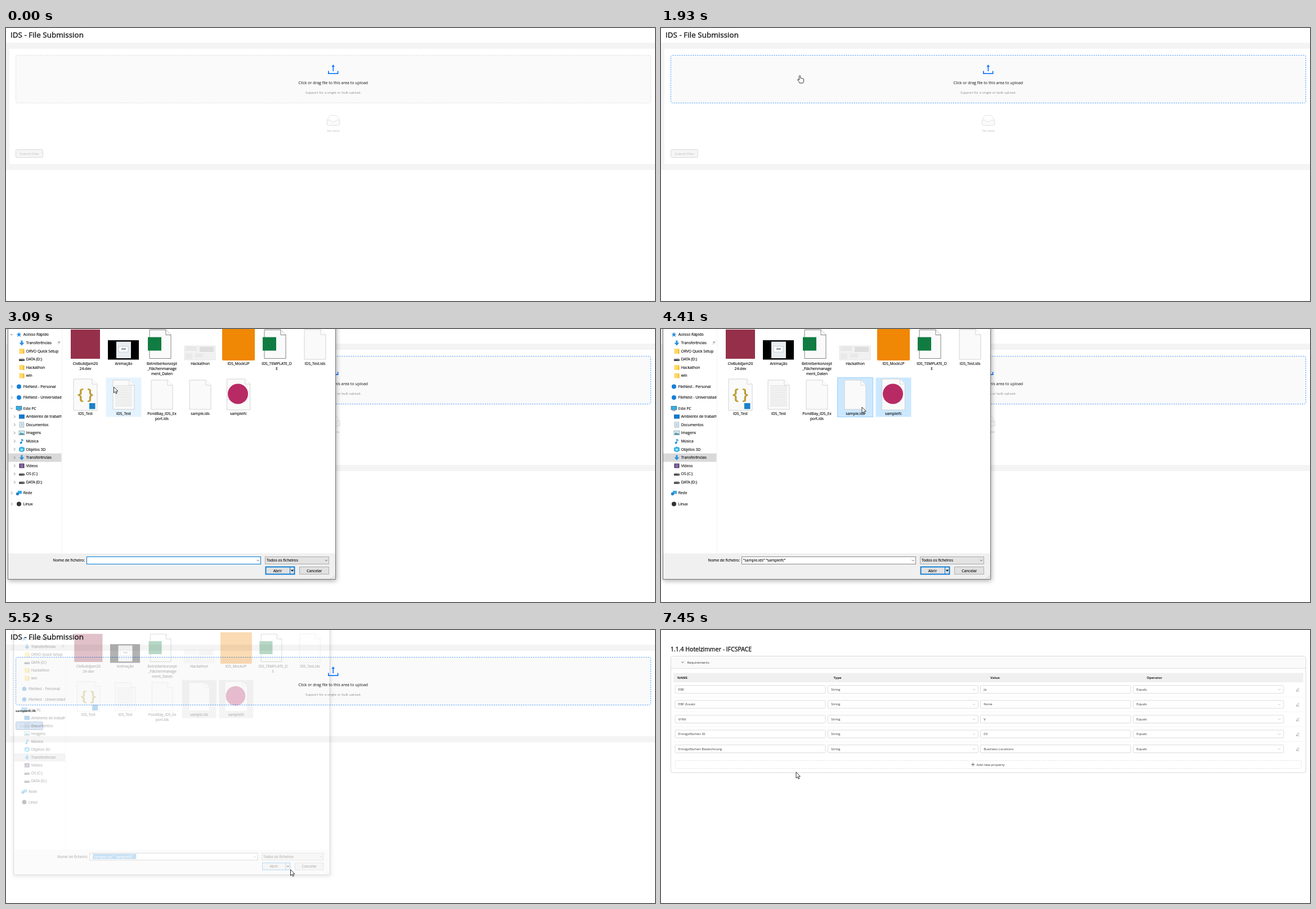
An HTML page that plays this animation: 1153x486 px, repeating every 8000 ms.

```html
<!DOCTYPE html>
<html lang="en">
<head>
<meta charset="utf-8">
<title>File submission</title>
<style>
html, body { margin: 0; width: 100%; height: 100%; overflow: hidden; background: #fff; }
svg { display: block; width: 100vw; height: 100vh; }
text { font-family: "Open Sans", "Noto Sans", sans-serif; white-space: pre; }
#dialog { filter: drop-shadow(1px 2px 4px rgba(0,0,0,.35)); }
#full text { stroke: currentColor; stroke-width: .12; }
.medium { stroke: #111; stroke-width: .3; }
</style>
</head>
<body>
<svg id="stage" viewBox="0 0 1153 486" xmlns="http://www.w3.org/2000/svg"></svg>
<script>
const LOOP = 8000;
const BLUE = [22, 119, 255], HOVER = [64, 150, 255], GREY = [217, 217, 217];

// ---- drawing helpers ----
const rect = (x, y, w, h, fill, more = '') =>
  `<rect x="${x}" y="${y}" width="${w}" height="${h}" fill="${fill}" ${more}/>`;
const path = (d, stroke, width = 1, fill = 'none', more = '') =>
  `<path d="${d}" stroke="${stroke}" stroke-width="${width}" fill="${fill}" ${more}/>`;
const dot = (x, y, r, fill) => `<circle cx="${x}" cy="${y}" r="${r}" fill="${fill}"/>`;
const text = (x, y, size, fill, str, more = '') =>
  `<text x="${x}" y="${y}" font-size="${size}" fill="${fill}" ${more}>${str}</text>`;
const group = (id, body, more = '') => `<g id="${id}" ${more}>${body}</g>`;
const MID = 'text-anchor="middle"';
const chevDown = (x, y, color, s = 2.2) =>
  path(`M${x - s} ${y - s / 2}l${s} ${s}l${s} ${-s}`, color, .8);
const chevRight = (x, y, color) => path(`M${x - 1} ${y - 2.4}l2.4 2.4l-2.4 2.4`, color, .8);

// ---- upload page ----
function uploadPage() {
  const tray = path('M572.9 76.5V81.1H589.6V76.5', '#1677ff', 1.8) +
    path('M581.3 77V68', '#1677ff', 1.7) +
    path('M581.3 65L584.2 69H578.4Z', 'none', 0, '#1677ff');
  const empty = '<ellipse cx="581.5" cy="170" rx="13" ry="4" fill="#f5f5f5"/>' +
    path('M570.5 164L575 156.5Q575.7 155.5 577 155.5H586Q587.3 155.5 588 156.5L592.5 164', '#dcdcdc', .8) +
    path('M570.5 164h6c1.2 0 1 2.3 2.6 2.6h4.8c1.6-.3 1.4-2.6 2.6-2.6h6v7.5q0 1.8-1.8 1.8h-18.4q-1.8 0-1.8-1.8z',
      '#dcdcdc', .8, '#fafafa') +
    text(581.5, 184.5, 6, '#bfbfbf', 'No data', MID);
  return group('backdrop', rect(0, 26, 1153, 227, '#f4f4f4', 'id="grey"') +
      rect(6, 37, 1147, 205, '#fff', 'id="card"') +
      rect(17.5, 48.5, 1128, 85, '#fafafa', 'id="drop" rx="3" stroke-dasharray="2 2"') + tray +
      text(581.3, 100.3, 7, '#111', 'Click or drag file to this area to upload', MID) +
      text(581.5, 116.6, 6, '#888', 'Support for a single or bulk upload.', MID) +
      group('empty', empty) +
      text(17, 146, 6, '#111', 'sampleifc.ifc', 'id="listed" font-weight="600"') +
      group('submit', rect(17.5, 216.5, 48, 14, '#f5f5f5', 'id="btn" rx="2"') +
        text(41.5, 226, 6, '#bfbfbf', 'Submit Files', MID + ' id="btnText"'))) +
    text(8, 17, 13.5, '#111', 'IDS - File Submission', 'id="title" class="medium"');
}

// ---- requirements page ----
const COLS = [25, 296.5, 567.5, 839];
const ROWS = [['EBF', 'Ja'], ['EBF Zusatz', 'None'], ['V/NV', 'V'],
  ['Ertragsflächen ID', '03'], ['Ertragsflächen Bezeichnung', 'Business Locations']];
const rowY = i => 105.8 + i * 26.45;

function resultPage() {
  let s = text(17, 38, 10.5, '#111', '1.1.4 Hotelzimmer - IFCSPACE', 'class="medium"') +
    rect(17.5, 46.5, 1128, 207.5, '#fff', 'rx="3" stroke="#d9d9d9"') +
    path('M18 68.5V49.5q0-2.5 2.5-2.5h1122q2.5 0 2.5 2.5V68.5z', 'none', 0, '#fafafa') +
    path('M18 68.3H1145', '#d9d9d9', .8) + chevDown(38.5, 57.5, '#333') +
    text(46.5, 59.6, 6, '#333', 'Requirements') + rect(22, 76.5, 1119, 16.5, '#f0f0f0');
  ['NAME', 'Type', 'Value', 'Operator'].forEach((label, i) => {
    s += text([29, 306.5, 585, 863][i], 86.7, 6, '#222', label, 'font-weight="700"');
  });
  ROWS.forEach(([name, value], r) => {
    const y = rowY(r);
    [name, 'String', value, 'Equals'].forEach((label, c) => {
      s += rect(COLS[c], y - 7, 267, 14, '#fff', `id="cell${r}_${c}" rx="1.5" stroke="#d9d9d9" stroke-width=".9"`) +
        text(COLS[c] + 5.8, y + 2.1, 6, '#333', label);
      if (c % 2) s += chevDown(COLS[c] + 259.5, y + .2, '#bbb');
    });
    s += path(`M1129 ${y + 1.5}l3.2-3.6l1.3 1.2l-3.2 3.5l-1.6.3zM1128.5 ${y + 3.2}h5.5`, '#999', .7);
    if (r < 4) s += path(`M22 ${y + 13.5}H1141`, '#f3f3f3', .8);
  });
  return s + rect(25.5, 232.5, 1112, 14, '#fff', 'rx="2" stroke="#d9d9d9" stroke-width=".9" stroke-dasharray="2 2"') +
    path('M551 239.5h6.4M554.2 236.3v6.4', '#444', .8) + text(560.5, 241.6, 6, '#333', 'Add new property');
}

// ---- file dialog ----
const ICONS = {
  star: (x, y) => path(`M${x} ${y - 4.5}l1.3 3h3.2l-2.5 2.1l1 3.3l-3-1.9l-3 1.9l1-3.3l-2.5-2.1h3.2z`, 'none', 0, '#2b8fe0'),
  down: (x, y) => path(`M${x - 1.5} ${y - 4.5}h3v4h3l-4.5 5l-4.5-5h3z`, 'none', 0, '#2b8fdf'),
  folder: (x, y) => rect(x - 4.5, y - 4.5, 9, 9, '#ffd968', 'rx=".6"') + rect(x + 2, y - 3, 2.5, 7.5, '#f2bf3f'),
  drive: (x, y) => rect(x - 5, y - .5, 10, 3.5, '#444', 'rx=".8"') + rect(x - 4, y - 1.8, 8, 1.4, '#bbb') +
    rect(x + 2, y + 1, 1.6, 1, '#6cf'),
  cloud: (x, y) => dot(x, y, 4, '#1580d8'),
  pc: (x, y) => rect(x - 5, y - 4, 10, 6.5, '#35aee9', 'stroke="#356" stroke-width=".6"') + rect(x - 3, y + 3.4, 6, 1.2, '#789'),
  desk: (x, y) => rect(x - 5, y - 3.8, 10, 7.5, '#1678c8'),
  doc: (x, y) => rect(x - 3.5, y - 4.5, 7, 9, '#fff', 'stroke="#79a" stroke-width=".8"') +
    path(`M${x - 2} ${y - 2}h4m-4 2h4m-4 2h4`, '#4a8fc0', .7),
  image: (x, y) => rect(x - 5, y - 3.8, 10, 7.6, '#cfeaf8', 'stroke="#899" stroke-width=".7"') +
    path(`M${x - 4.5} ${y + 3}l3-4l2.5 2.5l1.5-1.5l2 3z`, 'none', 0, '#3f8f9f'),
  music: (x, y) => path(`M${x} ${y + 3}v-7q.5 2 3 3`, '#1488d8', 1.3) + dot(x - 1.5, y + 3, 1.8, '#1488d8'),
  cube: (x, y) => path(`M${x} ${y - 4.5}l4.5 1.8v5.4l-4.5 1.8l-4.5-1.8v-5.4z`, '#1686b5', .6, '#38bde8') +
    rect(x - 1.5, y - 1, 3, 3, '#d8f5ff'),
  film: (x, y) => rect(x - 4.5, y - 4, 9, 8, '#443c50') + rect(x - 2.7, y - 3, 5.4, 6, '#8c64b4'),
  net: (x, y) => rect(x - 2, y - 4, 7, 5.5, '#35aee9') + dot(x - 2.5, y + 1.5, 2.7, '#2c80c8'),
  disc: (x, y) => dot(x, y, 4, '#333')
};
// [label, centre y, icon, depth, chevron]
const NAV = [
  ['Acesso Rápido', 10, 'star', 0, 'd'], ['Transferências', 25, 'down', 1], ['ORVO Quick Setup', 39.5, 'folder', 1],
  ['DATA (D:)', 54, 'drive', 1], ['Hackathon', 68.5, 'folder', 1], ['win', 83, 'folder', 1],
  ['FileNest - Personal', 102.5, 'cloud', 0, 'r'], ['FileNest - Universidade', 122, 'cloud', 0, 'r'],
  ['Este PC', 141.3, 'pc', 0, 'd'], ['Ambiente de trabalho', 156, 'desk', 1, 'r'], ['Documentos', 170.5, 'doc', 1, 'r'],
  ['Imagens', 185, 'image', 1, 'r'], ['Música', 199.7, 'music', 1, 'r'], ['Objetos 3D', 214.3, 'cube', 1, 'r'],
  ['Transferências', 229, 'down', 1, 'r'], ['Vídeos', 243.5, 'film', 1, 'r'], ['OS (C:)', 258, 'drive', 1, 'r'],
  ['DATA (D:)', 272.7, 'drive', 1, 'r'], ['Rede', 292, 'net', 0, 'r'], ['Linux', 311.5, 'disc', 0, 'r']
];

const sheet = (x, y, w = 38, h = 53, edge = '#c9c9c9') =>
  path(`M${x - w / 2} ${y}h${w - 9}l9 9v${h - 9}h${-w}z`, edge, .8, '#fafafa') +
  path(`M${x + w / 2 - 9} ${y}v9h9`, edge, .8, '#fff');
const table = x => sheet(x - 3, 1.5, 38, 51, '#666') + rect(x - 25, 14.5, 24, 24, '#107c41');
const lines = (x, y, w, n, gap, color) =>
  Array.from({ length: n }, (_, i) => path(`M${x} ${y + i * gap}h${w}`, color, .6)).join('');

const FILES = [
  [['CivBuildJam20', '24-dev'], x => rect(x - 26, 1, 52, 52, '#96304a')],
  [['Animação'], x => rect(x - 28, 20, 55, 34.5, '#000') + rect(x - 13, 22.5, 26, 29.5, '#e9edf0') +
    rect(x - 9, 31, 17, 10, '#fff', 'stroke="#b5bcc4" stroke-width=".7"') + rect(x - 4, 34, 8, 3, '#9aa5b0')],
  [['Betreiberkonzept', '_Flächenmanage', 'ment_Daten'], table],
  [['Hackathon'], x => rect(x - 28, 30, 55, 25, '#f1f1f1', 'stroke="#ddd" stroke-width=".6"') +
    lines(x - 26, 32.5, 20, 3, 2.5, '#ccc') + lines(x - 1, 33, 25, 4, 2.2, '#aaa') +
    lines(x - 26, 45, 12, 4, 2.4, '#d2d2d2') + lines(x - 9, 45, 14, 3, 2.4, '#d2d2d2')],
  [['IDS_MockUP'], x => rect(x - 29, -2, 58, 58, '#f08705', 'rx="2"')],
  [['IDS_TEMPLATE_D', 'E'], table],
  [['IDS_Test.ids'], x => sheet(x, 1)],
  [['IDS_Test'], x => sheet(x, 89, 42, 56) + text(x, 125, 27, '#c4a32a', '{ }', MID + ' font-weight="600"') +
    rect(x + 7, 132, 10.5, 10.5, '#1b80c9')],
  [['IDS_Test'], x => sheet(x, 91, 38, 52) + lines(x - 15, 101, 30, 13, 3, '#c2c2c2')],
  [['PondBay_IDS_Ex', 'port.ids'], x => sheet(x, 91, 38, 52)],
  [['sample.ids'], x => sheet(x, 91, 38, 52)],
  [['sampleifc'], x => sheet(x, 89, 41, 55) + dot(x - 1, 115.5, 18, '#b82a64')]
];
const fileX = i => 141 + 68 * (i % 7);

function dialogBox() {
  const size = 6.7, ink = '#000';
  let nav = '', chevs = '', files = '';
  NAV.forEach(([label, y, icon, depth, chev]) => {
    const x = 23 + depth * 5;
    nav += ICONS[icon](x, y) + text(x + 7.7, y + 2.4, size, ink, label);
    if (chev) chevs += (chev === 'd' ? chevDown : chevRight)(10 + depth * 5, y, '#666');
  });
  FILES.forEach(([label, icon], i) => {
    const x = fileX(i), low = i > 6;
    files += rect(x - 31.5, low ? 86.5 : -30, 63, low ? 70 : 116, 'none', `id="file${i}"`) + icon(x) +
      label.map((s, k) => text(x, (low ? 153 : 63.6) + 9 * k, size, ink, s, MID)).join('');
  });
  const full = rect(4, 221.5, 94.5, 15, '#d9d9d9') + group('nav', nav, 'clip-path="url(#navClip)"') +
    group('chevs', chevs) + path('M93 22.5l2.5 2.5m-1.2-3.4l2 2l-1.7.5l-1 1.3l-1.2-1.3zM92 27.5l2-2', '#888', .7) +
    path('M99.5 0V399', '#f2f2f2') + files +
    text(140, 414.2, 6.8, ink, 'Nome de ficheiro:', 'text-anchor="end"') +
    rect(143.5, 405.5, 309, 13, '#fff', 'id="field"') +
    rect(149, 407, 80, 9.5, '#3a8fd9', 'id="mark"') + text(146, 414.2, size, ink, '', 'id="fieldText"') +
    chevDown(447.7, 412, '#555') + rect(460.5, 405.5, 113, 13, '#e3e3e3', 'stroke="#adadad"') +
    text(463, 414.2, size, ink, 'Todos os ficheiros') + chevDown(569, 412, '#555') +
    rect(461.5, 423.5, 51, 13, '#e1e1e1', 'id="open" stroke="#0078d7"') +
    path('M504.5 423V437', '#0078d7') + text(482.5, 432.5, size, ink, 'Abrir', MID) +
    path('M505.8 428.8h5.4l-2.7 3z', 'none', 0, '#000') +
    rect(521.5, 423.5, 52, 13, '#e1e1e1', 'stroke="#adadad"') + text(547.8, 432.5, size, ink, 'Cancelar', MID) +
    path('M583 439v5M580.5 441.5v2.5M578 443v1', '#aaa', 1, 'none', 'stroke-dasharray="1.2 1.2"');
  const blank = [[83, 406, 58, 9], [143.5, 404.5, 310, 14], [460, 404.5, 114, 13.5], [460, 422, 54, 16],
    [520.5, 422, 54, 16], [574, 435, 11, 10]].map(b => rect(...b, '#fff')).join('');
  return '<clipPath id="navClip"><rect x="4" y="0" width="94.5" height="400"/></clipPath>' +
    rect(3.5, -111, 582, 556.5, '#fff', 'stroke="#777"') + rect(4, 399.5, 581, 45.5, '#f0f0f0') +
    group('blank', blank) + group('full', full);
}

const CURSORS = {
  arrow: 'M0 0V10.7L2.5 8.4L4.1 12.1L5.8 11.4L4.2 7.8H7.4Z',
  hand: 'M-1.2 1.2Q0-.6 1.2 1.2V5.4Q2.3 4.5 3.2 5.7Q4.5 4.9 5.2 6.2Q7 5.8 7 7.6V10.5Q6.8 12.5 5.5 13.9H-.3Q-1.5 11.5-3.8 8.6Q-4.2 7-2.8 7.1Q-1.8 7.3-1.2 8.6Z',
  beam: 'M-1.8-5H-.4V5H-1.8M1.8-5H.4V5H1.8'
};

document.getElementById('stage').innerHTML = group('upload', uploadPage()) + group('result', resultPage()) +
  group('dialog', dialogBox()) + path('', '#111', .85, '#fff', 'id="cursor" stroke-linejoin="round"');

// ---- motion ----
const $ = id => document.getElementById(id);
const set = (id, attrs) => { for (const k in attrs) $(id).setAttribute(k, attrs[k]); };
const show = (id, on) => { $(id).style.display = on ? '' : 'none'; };
const ramp = (t, a, b) => Math.min(1, Math.max(0, (t - a) / (b - a)));
const mix = (a, b, p) => `rgb(${a.map((v, i) => Math.round(v + (b[i] - v) * p))})`;
const inside = (p, x, y, w, h) => p[0] >= x && p[0] <= x + w && p[1] >= y && p[1] <= y + h;

// bursts of screen updates: start, end, count
const BURSTS = [[450, 1200, 12], [1270, 1400, 3], [1600, 2400, 10], [2470, 3160, 11], [3300, 3720, 7],
  [3860, 4620, 12], [4690, 5450, 12], [5520, 6320, 13], [6380, 7180, 12], [7240, 7450, 4]];
function stepTime(t) {
  const burst = BURSTS.filter(b => t >= b[0]).pop();
  if (!burst) return 0;
  const [a, b, n] = burst, step = (b - a) / (n - 1);
  return a + step * Math.min(n - 1, Math.floor((t - a + 15) / step));
}

// time, x, y of the pointer tip
const TRACK = [[450, 200, 424], [720, 205, 290], [1064, 279, 75.5], [1200, 356, 92.5], [1400, 385, 95], [1600, 383, 95],
  [2300, 25, 66.5], [2470, 25, 66.5], [3091, 191.5, 103], [3300, 212, 106], [3650, 410, 120], [3860, 412, 121],
  [4270, 357, 139], [4690, 357, 139], [5180, 482, 427], [5380, 484, 427], [5520, 505.5, 426.5], [6180, 42, 170],
  [6380, 43, 171], [7180, 215, 195], [7450, 240, 253]];
function pointer(t) {
  const i = TRACK.findIndex(k => k[0] > t);
  if (i < 0) return TRACK[TRACK.length - 1].slice(1);
  const a = TRACK[Math.max(0, i - 1)], b = TRACK[i], p = ramp(t, a[0], b[0]);
  return [a[1] + (b[1] - a[1]) * p, a[2] + (b[2] - a[2]) * p];
}

function drawDialog(t, p) {
  const on = t >= 2300 && t < 5585;
  show('dialog', on);
  if (!on) return;
  const closing = t >= 5450;
  let scale = 1, alpha = 1;
  if (t < 2350) { scale = .98; alpha = .6; }
  else if (t < 2460) { scale = .996; alpha = .94; }
  else if (closing) { scale = t < 5515 ? .988 : .965; alpha = t < 5515 ? .8 : .3; }
  set('dialog', { opacity: alpha, transform: `translate(294.2 167) scale(${scale}) translate(-294.2 -167)` });
  // the page reads through at full strength while the dialog fades out
  $('dialog').style.mixBlendMode = closing ? 'multiply' : 'normal';
  show('full', t >= 2530);
  show('blank', t < 2530);
  set('chevs', { opacity: 1 - ramp(t, 3300, 4250) });
  FILES.forEach((_, i) => {
    const picked = (i === 11 && t >= 3650) || (i === 10 && t >= 4270);
    const over = t >= 2530 && inside(p, fileX(i) - 32, i > 6 ? 86 : -30, 64, i > 6 ? 71 : 116);
    set('file' + i, { fill: picked ? (closing ? '#d9d9d9' : '#cce8ff') : over ? '#e5f3ff' : 'none',
      stroke: picked && over ? '#99d1ff' : 'none' });
  });
  const name = t >= 4270 ? '"sample.ids" "sampleifc"' : t >= 3650 ? 'sampleifc' : '';
  if ($('fieldText').textContent !== name) $('fieldText').textContent = name;
  show('mark', closing);
  set('fieldText', { fill: closing ? '#fff' : '#000', color: closing ? '#fff' : '#000', x: closing ? 149 : 146 });
  set('field', { stroke: t < 3860 ? '#0078d7' : '#8a8a8a' });
  set('open', { 'stroke-width': closing ? 1 : 1.8, fill: t >= 5180 && !closing ? '#cce4f7' : '#e1e1e1' });
}

function draw(t) {
  const p = pointer(t), loaded = t >= 5450, done = t >= 6375;
  show('upload', !done);
  show('result', done);
  show('backdrop', t < 6315);
  set('grey', { height: loaded ? 174 : 227 });
  set('card', { height: loaded ? 152 : 205 });
  set('drop', { stroke: mix(GREY, HOVER, ramp(t, 980, 1250) * (1 - ramp(t, 5560, 5860))) });
  show('empty', !loaded);
  show('listed', loaded);
  const live = ramp(t, 5490, 5740);
  set('submit', { transform: `translate(0 ${loaded ? -53 : 0})` });
  set('btn', { fill: mix([245, 245, 245], BLUE, live), stroke: mix(GREY, BLUE, live) });
  set('btnText', { fill: mix([191, 191, 191], [255, 255, 255], live) });
  drawDialog(t, p);

  let kind = 'arrow';
  if (t < 2465 ? inside(p, 17, 48, 1129, 86) : !done && loaded && inside(p, 17, 163, 49, 15)) kind = 'hand';
  ROWS.forEach((_, r) => {
    const over = done && inside(p, COLS[0], rowY(r) - 7, 267, 14);
    if (over) kind = 'beam';
    set(`cell${r}_0`, { stroke: over ? '#4096ff' : '#d9d9d9' });
  });
  show('cursor', t >= 450);
  set('cursor', { d: CURSORS[kind], transform: `translate(${p[0]} ${p[1]})` });
}

const start = performance.now();
function tick(now) {
  draw(stepTime(Math.max(0, now - start) % LOOP));
  requestAnimationFrame(tick);
}
draw(0);
requestAnimationFrame(tick);
</script>
</body>
</html>
```
